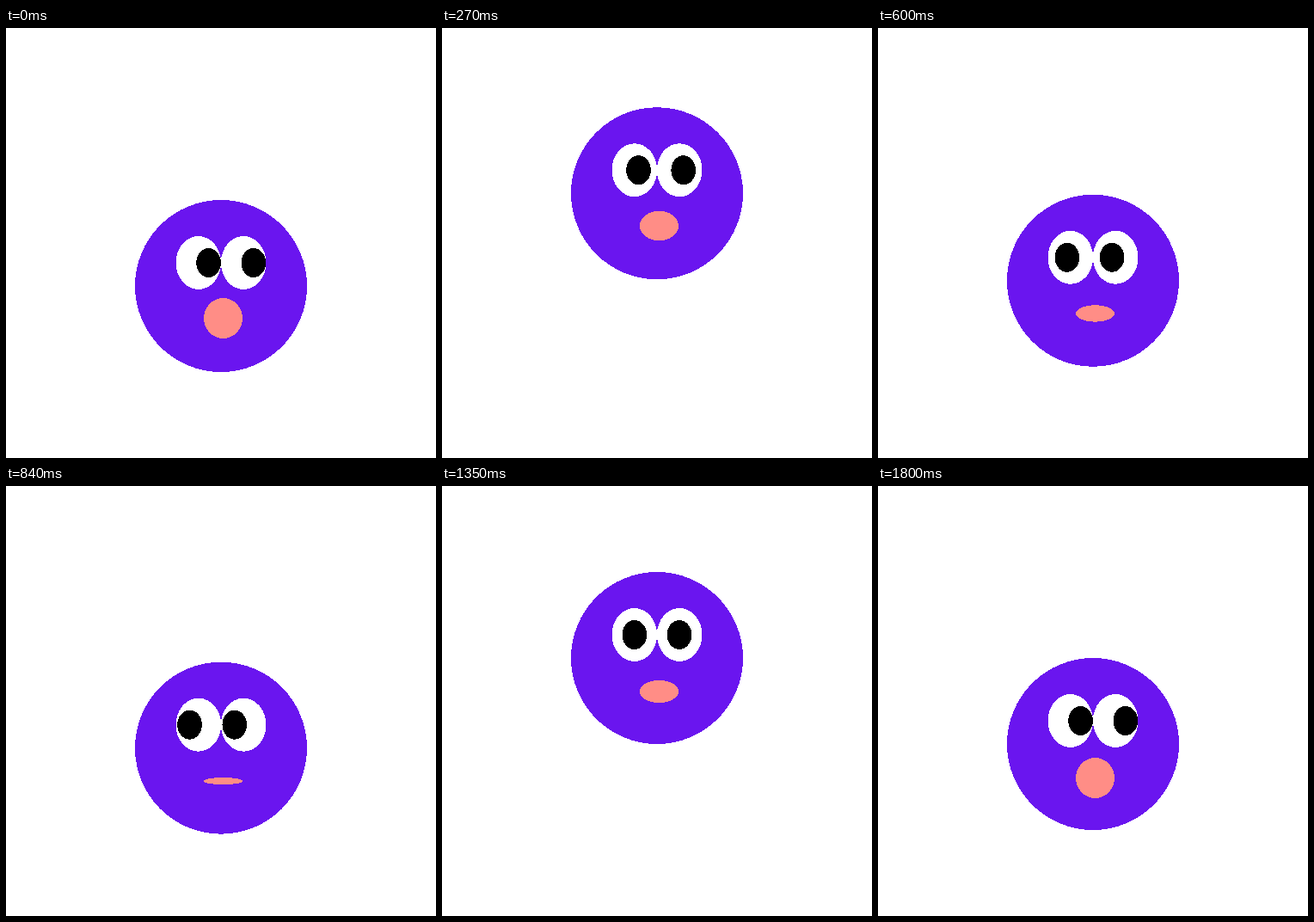
Write an HTML page that moves like this. It is 500 by 500 pixels and loops after 1860 ms.

```html
<!DOCTYPE html>
<html lang="en">
<head>
<meta charset="utf-8">
<title>Bouncing face</title>
<style>
  html, body { margin: 0; width: 100%; height: 100%; overflow: hidden; background: #fff; }
  svg { display: block; width: 100%; height: 100%; }
</style>
</head>
<body>
<svg viewBox="0 0 500 500" shape-rendering="crispEdges">
  <g id="face">
    <circle cx="250" cy="100" r="100" fill="#6a15ef"/>
    <g fill="#fff">
      <ellipse cx="223.8" cy="73" rx="26.3" ry="31"/>
      <ellipse cx="276.2" cy="73" rx="26.3" ry="31"/>
    </g>
    <g id="pupils">
      <ellipse cx="0" cy="73" rx="14.3" ry="17"/>
      <ellipse cx="52.2" cy="73" rx="14.3" ry="17"/>
    </g>
    <ellipse id="mouth" cx="252.5" rx="22.5" fill="#ff8d86"/>
  </g>
</svg>
<script>
const [face, pupils, mouth] = ['face', 'pupils', 'mouth'].map(id => document.getElementById(id));
const STEP = 30, LENGTH = 1800, LOOP = 1860;

const lerp = (a, b, p) => a + (b - a) * p;
const bezier = (a, b, s) => 3 * a * s * (1 - s) ** 2 + 3 * b * s * s * (1 - s) + s ** 3;

// Ease out with an overshoot; bisection finds the curve parameter for p.
function backOut(p) {
  let lo = 0, hi = 1;
  for (let i = 0; i < 24; i++) {
    const mid = (lo + hi) / 2;
    if (bezier(0.175, 0.32, mid) < p) lo = mid; else hi = mid;
  }
  return bezier(0.82, 1.275, (lo + hi) / 2);
}

// Two bounces: a springy one, then a linear one.
function faceTop(p) {
  const quarter = Math.min(3, Math.floor(p * 4));
  const local = p * 4 - quarter;
  const k = quarter < 2 ? backOut(local) : local;
  return quarter % 2 ? lerp(100, 200, k) : lerp(200, 100, k);
}

function draw(time) {
  const t = Math.min(LENGTH, Math.floor((time % LOOP) / STEP) * STEP);
  const p = t / LENGTH;
  const swing = 1 - Math.abs(1 - 2 * p);
  face.setAttribute('transform', `translate(0 ${faceTop(p)})`);
  pupils.setAttribute('transform', `translate(${lerp(235.6, 212, swing)} 0)`);
  mouth.setAttribute('cy', lerp(137.5, 139.5, p));
  mouth.setAttribute('ry', lerp(23.5, 2.75, swing));
}

const start = performance.now();
function tick() {
  draw(performance.now() - start);
  requestAnimationFrame(tick);
}
tick();
</script>
</body>
</html>
```
